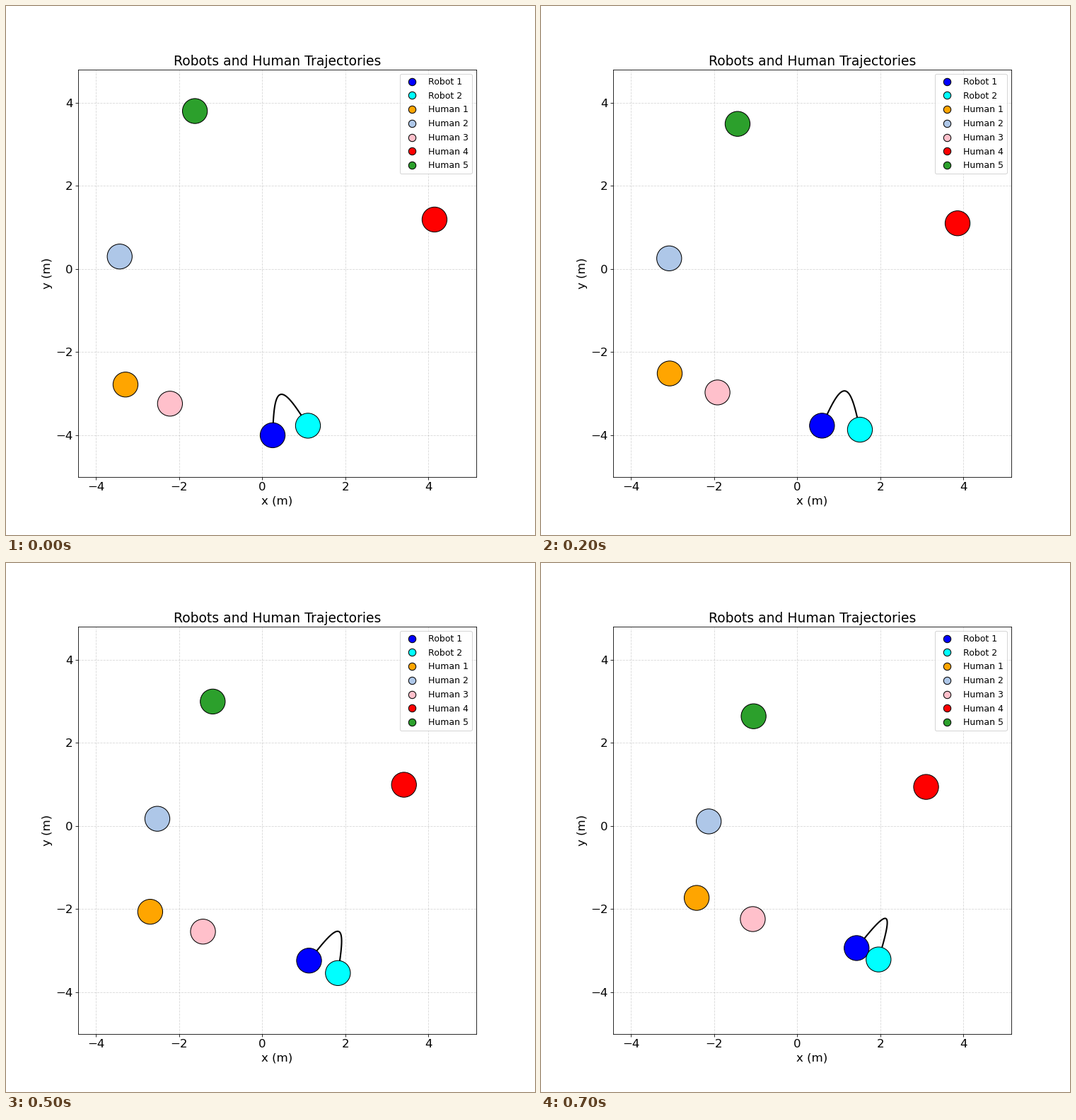
Write a matplotlib script that moves like this. It is 748 px wide and 748 px high and loops after 800 ms.

```python
import numpy as np
import matplotlib.pyplot as plt
from matplotlib.animation import FuncAnimation
from matplotlib.lines import Line2D
from matplotlib.patches import Circle

FRAMES, INTERVAL = 8, 100
RADIUS, ROPE = 0.3, 2.0
FAST, SLOW = 0.25, 0.177
KEY_STEPS = (0, 3, 7)


def walk(start, *legs):
    """Path made of legs, each (step count, step length, heading in degrees)."""
    points = [np.array(start)]
    for count, length, heading in legs:
        angle = np.radians(heading)
        step = length * np.array([np.cos(angle), np.sin(angle)])
        points += [points[-1] + step * (i + 1) for i in range(count)]
    return np.array(points)


def drift(*keys):
    """Uniformly accelerated path through three key points."""
    return np.vander(range(FRAMES), 3) @ np.polyfit(KEY_STEPS, keys, 2)


AGENTS = {
    "Robot 1": ("blue", walk((0.25, -4.0), (1, FAST, 0), (1, FAST, 67.5),
                             (4, FAST, 45), (1, SLOW, 45))),
    "Robot 2": ("cyan", walk((1.10, -3.77), (1, FAST, -22.5), (2, SLOW, 0),
                             (4, SLOW, 67.5))),
    "Human 1": ("orange", drift((-3.29, -2.78), (-2.95, -2.37), (-2.42, -1.73))),
    "Human 2": ("#aec7e8", drift((-3.43, 0.30), (-2.90, 0.23), (-2.13, 0.11))),
    "Human 3": ("pink", drift((-2.22, -3.24), (-1.76, -2.83), (-1.07, -2.24))),
    "Human 4": ("red", drift((4.145, 1.19), (3.71, 1.06), (3.10, 0.94))),
    "Human 5": ("#2ca02c", drift((-1.62, 3.80), (-1.35, 3.33), (-1.05, 2.64))),
}


def rope_curve(a, b):
    """Sine arch over the chord from a to b, taller as the ends close in."""
    chord = b - a
    length = np.hypot(*chord)
    normal = np.array([-chord[1], chord[0]]) / length
    height = np.sqrt(ROPE ** 2 - length ** 2) / 2
    t = np.linspace(0, 1, 100)[:, None]
    return a + t * chord + height * np.sin(np.pi * t) * normal


plt.rcParams["font.family"] = "DejaVu Sans"
fig, ax = plt.subplots(figsize=(10, 10), dpi=74.8)
ax.set_aspect("equal")
ax.set(xlim=(-4.435, 5.15), ylim=(-5, 4.8),
       xticks=range(-4, 5, 2), yticks=range(-4, 5, 2))
ax.tick_params(labelsize=16)
ax.set_xlabel("x (m)", fontsize=16)
ax.set_ylabel("y (m)", fontsize=16)
ax.set_title("Robots and Human Trajectories", fontsize=18)
ax.grid(True, linestyle="--", alpha=0.5)
ax.set_axisbelow(True)

rope, = ax.plot([], [], color="black", lw=2, zorder=2)
discs, handles = {}, []
for name, (color, _) in AGENTS.items():
    discs[name] = ax.add_patch(Circle((0, 0), RADIUS, facecolor=color,
                                      edgecolor="black", lw=1, zorder=3))
    handles.append(Line2D([], [], linestyle="none", marker="o", markersize=10,
                          markerfacecolor=color, markeredgecolor="black",
                          label=name))
ax.legend(handles=handles, loc="upper right", fontsize=12, labelspacing=0.54)


def update(frame):
    for name, (_, path) in AGENTS.items():
        discs[name].center = path[frame]
    ends = [AGENTS[name][1][frame] for name in ("Robot 1", "Robot 2")]
    rope.set_data(*rope_curve(*ends).T)
    return [rope, *discs.values()]


anim = FuncAnimation(fig, update, frames=FRAMES, interval=INTERVAL,
                     repeat=True, repeat_delay=0)
plt.show()
```
